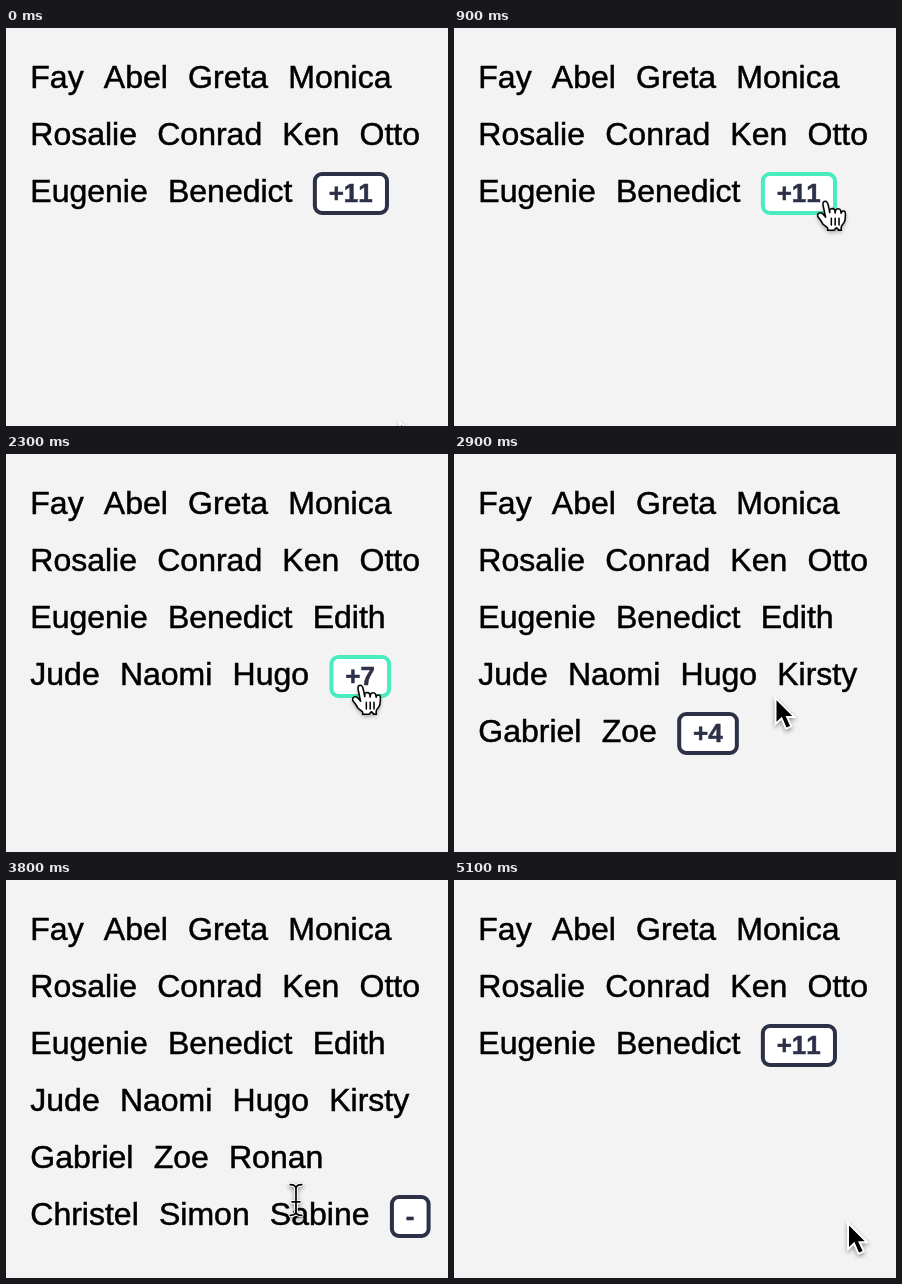
Animation, 442 px wide and 398 px high, one loop 5900 ms. Source, as an HTML page with a canvas:

```html
<!DOCTYPE html>
<html lang="en">
<head>
<meta charset="utf-8">
<title>Expandable name list</title>
<style>
html, body { margin: 0; width: 100%; height: 100%; overflow: hidden; background: #f3f3f3; }
canvas { display: block; }
</style>
</head>
<body>
<canvas id="stage" width="442" height="398"></canvas>
<script>
const ctx = document.getElementById('stage').getContext('2d');
const LOOP = 5900, STEP = 100;
const LEFT = 24.3, RIGHT = 428, GAP = 20.2, BASELINE = 60, LINE = 57;
const FAMILY = '"Liberation Sans", Arial, sans-serif';
const NAME_FONT = '32px ' + FAMILY, BUTTON_FONT = 'bold 26px ' + FAMILY;
const DARK = '#2d3148', GREEN = '#48ecbf';

const names = ('Fay Abel Greta Monica Rosalie Conrad Ken Otto Eugenie Benedict Edith ' +
  'Jude Naomi Hugo Kirsty Gabriel Zoe Ronan Christel Simon Sabine').split(' ');

// [time, visible names]
const clicks = [[0, 10], [1300, 14], [2700, 17], [3500, 21], [5000, 10]];

// [time, x, y] of the pointer hot spot
const path = [
  [0, 395, 397], [600, 394, 220], [900, 371, 172.5], [1200, 356, 168],
  [1500, 355.5, 170], [1900, 355.5, 170], [2300, 354, 230.5], [2700, 354, 230.5],
  [3200, 264.5, 275.5], [3500, 264.5, 275.5], [3800, 290, 320], [4300, 393, 345.5],
  [4500, 393, 345.5], [4800, 395, 345.5]
];

const handShape = new Path2D('m11.3 20.4c-.3-.4-.6-1.1-1.2-2-.3-.5-1.2-1.5-1.5-1.9-.2-.4-.2-.6-.1-1 .1-.6.7-1.1 1.4-1.1.5 0 1 .4 1.4.7.2.2.5.6.7.8.2.2.2.3.4.5.2.3.3.5.2.1-.1-.5-.5-1.8-.7-3.2l-.6-2.8c-.1-.5-.1-1.4.3-1.8.3-.3.9-.4 1.3-.2.5.3.8 1 .9 1.3.4 1.4.8 3 1 4.8 0-.4-.1-1.1 0-1.5.1-.3.3-.7.7-.8.9-.2 1.4 0 1.7.4.4.6.4 1.9.4 1.8.1-.4.1-1.2.3-1.6.5-.8 1.9-.8 2.4 0 .2.3.3 1.3.4 1.7 0 .1.1-.4.3-.7.4-.6 1.8-.8 1.9.6v1.8c0 1.5-.3 2.8-.9 3.5 0 0-1.1 1.2-1.2 1.8-.2.8-.1 1.3 0 1.9-1.2.2-1.7.1-2.2-1.1-.2-.3-.5-.3-.7 0-.2.4-.7 1.1-1.1 1.1-.7.1-2.1 0-3.1 0 0 0 .2-1-.2-1.4z');
const handLines = new Path2D('M19.6 20.7v-3.4M17.6 20.7v-3.5M15.6 20.7v-3.4');
const arrowShape = new Path2D('M9.2 7.3V18.5L12 15.8 14.4 21.4 16.3 20.6 13.9 15.5H17.4z');
const beamShape = new Path2D('M-3-8Q0-8 0-6Q0-8 3-8M0-6V6M-3 8Q0 8 0 6Q0 8 3 8M-2 1H2');

const cursors = {
  hand() {
    ctx.translate(-12.3, -8);
    fill(handShape, '#fff');
    stroke(handShape, '#000', 0.8);
    stroke(handLines, '#000', 0.8);
  },
  arrow() {
    ctx.translate(-9.2, -7.3);
    stroke(arrowShape, '#fff', 2);
    fill(arrowShape, '#000');
  },
  beam() {
    stroke(beamShape, '#fff', 1.9);
    stroke(beamShape, '#000', 0.9);
  }
};

function fill(shape, color) {
  ctx.fillStyle = color;
  ctx.fill(shape);
  ctx.shadowColor = 'transparent';
}

function stroke(shape, color, width) {
  ctx.strokeStyle = color;
  ctx.lineWidth = width;
  ctx.stroke(shape);
  ctx.shadowColor = 'transparent';
}

function measure(text, font) {
  ctx.font = font;
  return ctx.measureText(text).width;
}

// A hairline outline gives the text its slightly heavier weight.
function drawText(text, x, y, font, color) {
  ctx.font = font;
  ctx.fillStyle = ctx.strokeStyle = color;
  ctx.lineWidth = 0.5;
  ctx.fillText(text, x, y);
  ctx.strokeText(text, x, y);
}

// Flows the visible names and the button into lines.
function layout(count) {
  const label = count < names.length ? '+' + (names.length - count) : '-';
  let x = LEFT, y = BASELINE;
  return [...names.slice(0, count), label].map((text, i) => {
    const button = i === count;
    const width = button ? measure(text, BUTTON_FONT) + 32 : measure(text, NAME_FONT);
    if (x + width > RIGHT) { x = LEFT; y += LINE; }
    const item = { text, button, x, y, width };
    x += width + GAP;
    return item;
  });
}

function pointerAt(t) {
  const next = path.findIndex(key => key[0] > t);
  if (next < 0) return path[path.length - 1].slice(1);
  const [t0, x0, y0] = path[next - 1], [t1, x1, y1] = path[next];
  const u = (t - t0) / (t1 - t0), k = u * u * (3 - 2 * u);
  return [x0 + (x1 - x0) * k, y0 + (y1 - y0) * k];
}

function drawButton({ text, x, y, width }, hovered) {
  ctx.beginPath();
  ctx.roundRect(x + 2.2, y - 28, width - 4, 39, 7);
  ctx.fillStyle = '#fff';
  ctx.fill();
  ctx.lineWidth = 4;
  ctx.strokeStyle = hovered ? GREEN : DARK;
  ctx.stroke();
  drawText(text, x + 16, y - 0.5, BUTTON_FONT, DARK);
}

function drawCursor(kind, x, y) {
  ctx.save();
  ctx.translate(x, y);
  ctx.scale(1.92, 1.92);
  ctx.lineCap = 'round';
  ctx.shadowColor = 'rgba(0,0,0,.4)';
  ctx.shadowBlur = 4;
  ctx.shadowOffsetY = 2;
  cursors[kind]();
  ctx.restore();
}

function draw(t) {
  const [px, py] = pointerAt(t);
  const count = clicks.filter(click => click[0] <= t).pop()[1];
  const items = layout(count);
  const target = items.find(({ x, y, width }) =>
    px >= x && px <= x + width && py >= y - 30 && py <= y + 13);

  ctx.fillStyle = '#f3f3f3';
  ctx.fillRect(0, 0, 442, 398);
  for (const item of items) {
    if (item.button) drawButton(item, item === target);
    else drawText(item.text, item.x, item.y, NAME_FONT, '#000');
  }
  drawCursor(!target ? 'arrow' : target.button ? 'hand' : 'beam', px, py);
}

ctx.fontKerning = 'none';
const start = performance.now();
function tick() {
  const t = (performance.now() - start) % LOOP;
  draw(Math.floor(t / STEP) * STEP);
  requestAnimationFrame(tick);
}
tick();
</script>
</body>
</html>
```
